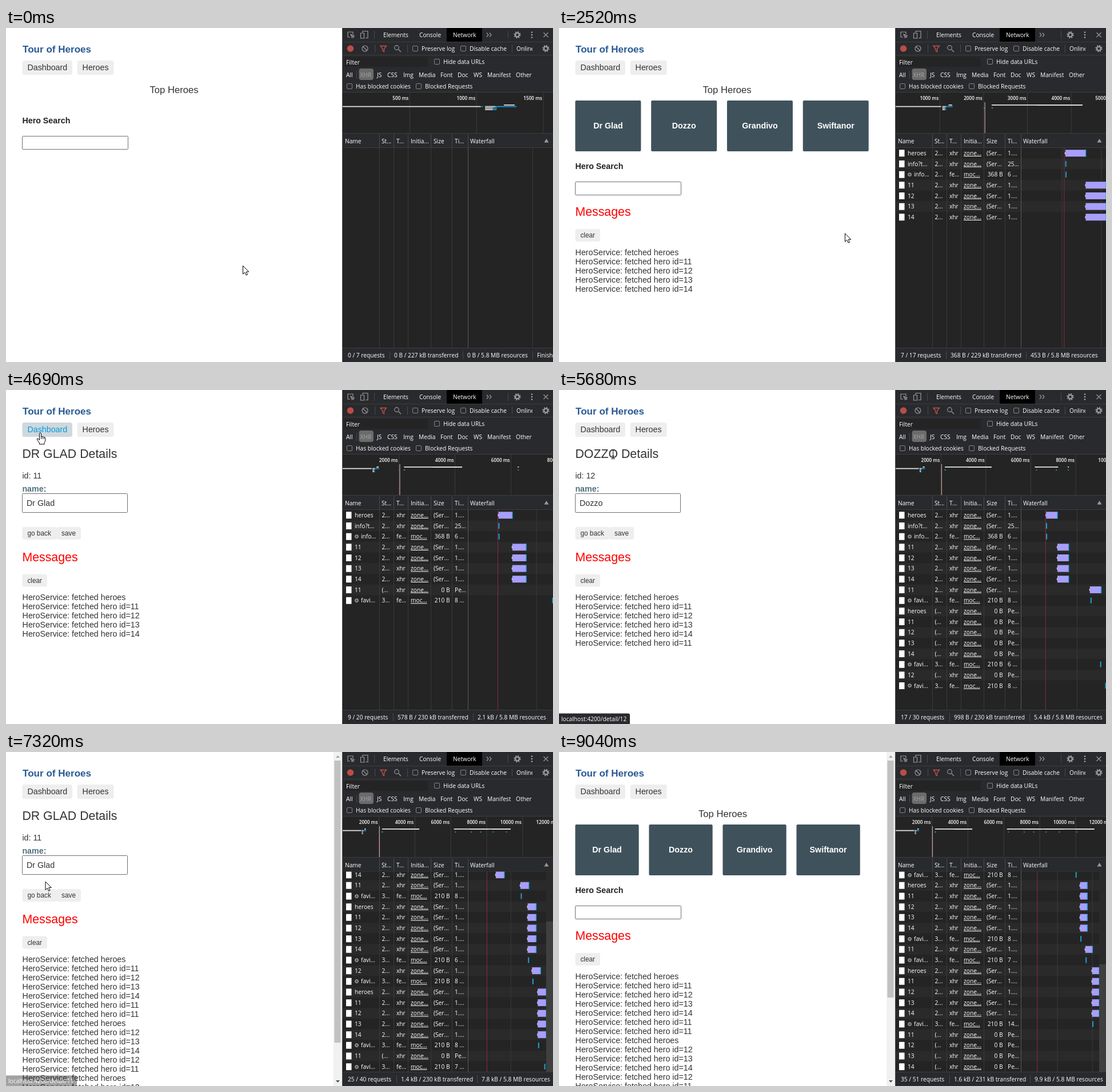
Recreate the animation shown at these times as an HTML page. Size 957 by 585 pixels, loop 9.21 s.

```html
<!DOCTYPE html>
<html lang="en">
<head>
<meta charset="utf-8">
<title>Tour of Heroes</title>
<style>
  html, body { margin: 0; width: 100%; height: 100%; overflow: hidden; background: #fff; }
  svg { display: block; width: 957px; height: 585px; }
  text { font: 14.27px "Liberation Sans", Arial, sans-serif; fill: #333; white-space: pre; }
  .b { font-weight: 700; }
  .h1 { font-size: 17.07px; font-weight: 700; fill: #285a94; }
  .h2 { font-size: 21.33px; }
  .h3 { font-size: 16.64px; }
  .btn { font-size: 11.85px; }
  .mid { text-anchor: middle; }
  .end { text-anchor: end; }
  .dev { font: 500 10.2px "Open Sans", "Noto Sans", sans-serif; fill: #fff; }
  .tick { font-size: 8.2px; font-weight: 600; }
  .u { text-decoration: underline; }
  .gear { font: 9.5px "DejaVu Sans", sans-serif; fill: #ddd; }
  .icon { fill: none; stroke: #9a9a9a; stroke-width: 1.2; }
</style>
</head>
<body>
<svg viewBox="0 0 957 585">
  <defs><clipPath id="list"><rect x="588" y="209.5" width="369" height="350.5"/></clipPath></defs>
  <g id="page"></g>
  <g id="tools"></g>
  <g id="net"></g>
  <g id="tip"></g>
  <g id="cursor"></g>
</svg>
<script>
const LOOP = 9210, CLOCK = 2090, LATENCY = 1040, ROW = 18.667;
const HEROES = { 11: 'Dr Glad', 12: 'Dozzo', 13: 'Grandivo', 14: 'Swiftanor' };
const IDS = [11, 12, 13, 14];
const $ = id => document.getElementById(id);

// Markup helpers
const rect = (x, y, w, h, fill, more = '') =>
  `<rect x="${x}" y="${y}" width="${Math.max(0, w)}" height="${h}" fill="${fill}" ${more}/>`;
const text = (x, y, str, cls = '', more = '') => `<text x="${x}" y="${y}" class="${cls}" ${more}>${str}</text>`;
const dev = (x, mid, str, cls = '') => text(x, mid + 3.7, str, 'dev ' + cls);
const path = (d, more = 'class="icon"') => `<path d="${d}" ${more}/>`;
const latest = (list, t) => list.filter(e => e[0] <= t).pop();

// Timeline: [time, shown hero id or 0 for the dashboard]
const VISITS = [[0, 0], [4100, 11], [4980, 0], [5510, 12], [6200, 0], [6940, 11], [7910, 0]];
const FAVICON_MS = [8, 6, 8, 8, 7, 14];

const rows = [], messages = [];
const fetchRows = (at, names) => names.forEach(name => rows.push({ at, end: at + LATENCY, name, kind: 'xhr' }));
const log = (at, names) => names.forEach(name => messages.push([at, name]));
const RELOAD = [11, 'heroes', 12, 13, 14];

fetchRows(100, ['heroes']);
rows.push({ at: 110, end: 110, name: 'info?t...', kind: 'info', ms: 25 });
rows.push({ at: 120, end: 120, name: 'info...', kind: 'worker', ms: 6 });
fetchRows(1130, IDS);
log(1130, ['heroes']);
log(2170, IDS);
VISITS.slice(1).forEach(([at, id], i) => {
  fetchRows(at, id ? [id] : ['heroes', ...IDS]);
  rows.push({ at: at + 80, end: at + 80, name: 'favi...', kind: 'worker', ms: FAVICON_MS[i] });
  log(at + LATENCY, id ? [id] : RELOAD);
});
fetchRows(8950, IDS);

const STATUS = [
  [0, '0 / 7', '0 B / 227', '0 B', 679, 807],
  [100, '3 / 13', '368 B / 229', '453 B', 685, 825],
  [1130, '7 / 17', '368 B / 229', '453 B', 685, 825],
  [4180, '9 / 20', '578 B / 230', '2.1 kB', 685, 825],
  [5060, '15 / 28', '788 B / 230', '3.7 kB', 691, 831],
  [5590, '17 / 30', '998 B / 230', '5.4 kB', 691, 831],
  [6280, '23 / 37', '1.2 kB / 230', '6.2 kB', 691, 832],
  [7020, '25 / 40', '1.4 kB / 230', '7.8 kB', 691, 832],
  [7990, '31 / 46', '1.6 kB / 231', '9.9 kB', 691, 832],
  [8950, '35 / 51', '1.6 kB / 231', '9.9 kB', 691, 832]
];
const OVERVIEW = [[0, 1575], [100, 2630], [460, 3200], [1140, 3900], [2150, 4800], [4180, 7510],
                  [5590, 9360], [7020, 11700]];
const PATH = [
  [0, 414.5, 416.5], [1840, 414.5, 416.5], [1950, 429, 410], [2370, 429, 410], [2520, 500, 360],
  [2850, 640, 300], [3270, 690, 282], [3630, 316, 263], [3950, 95, 200], [4100, 90, 194],
  [4370, 90, 194], [4690, 60, 75], [4840, 60, 75], [4980, 62, 77], [5350, 215, 165],
  [5510, 213, 168], [5680, 95, 113], [5760, 70, 80], [6200, 66, 77], [6610, 72, 100],
  [6850, 72, 100], [6940, 78, 170], [7320, 69, 227], [7770, 60, 246], [LOOP, 60, 246]
];
const CURSOR_GONE = 8060;
// Link preview: [shown, fade start, gone, hero id]
const TIPS = [[3890, 4150, 4180, 11], [5270, 5720, 5780, 12], [6900, 7190, 7420, 11]];

function pointer(t) {
  const i = PATH.findIndex(k => k[0] > t), [t0, x0, y0] = PATH[i - 1], [t1, x1, y1] = PATH[i];
  const k = (t - t0) / (t1 - t0);
  return { x: x0 + (x1 - x0) * k, y: y0 + (y1 - y0) * k, on: t < CURSOR_GONE };
}

function drawPage(t, p) {
  let shape = 'arrow', out = '';
  const over = (x, y, w, h, kind) => {
    const hit = p.on && p.x >= x && p.x < x + w && p.y >= y && p.y < y + h;
    if (hit) shape = kind;
    return hit;
  };
  const button = (x, y, w, h, label, cls, base) => {
    const hot = over(x, y, w, h, 'hand');
    out += rect(x, y, w, h, hot ? '#cfd8dc' : '#eee', 'rx="3.5"') +
      text(x + 9, base, label, cls, hot ? 'style="fill:#039be5"' : '');
  };
  const field = (y, w, h) => {
    const hot = over(28, y, w, h, 'beam');
    out += rect(28.5, y + .5, w - 1, h - 1, '#fff', `rx="1" stroke="${hot ? '#333' : '#707070'}"`);
  };

  const id = latest(VISITS, t)[1];
  const said = messages.filter(m => m[0] <= t);
  const loaded = said.length > 0;
  const top = id ? 292.5 : 322;
  const height = loaded ? top + 80 + 16 * said.length + 15 : 0;
  const width = height > 585 ? 573 : 588;

  out += text(29, 43.3, 'Tour of Heroes', 'h1');
  button(28.4, 57, 87.5, 25, 'Dashboard', '', 74);
  button(124.6, 57, 64, 25, 'Heroes', '', 74);

  if (id) {
    const name = HEROES[id];
    over(28, 102, 160, 20, 'beam');
    out += text(28.4, 119.3, name.toUpperCase() + ' Details', 'h2') + text(28.4, 154.8, 'id: ' + id) +
      text(28.4, 178, 'name:', 'b', 'style="fill:#52707c"');
    field(181, 185, 34);
    out += text(36, 203, name);
    button(28.4, 240, 60, 22, 'go back', 'btn', 255.3);
    button(88, 240, 43, 22, 'save', 'btn', 255.3);
  } else {
    out += text(width / 2, 113.7, 'Top Heroes', 'h3 mid');
    if (loaded) {
      const pitch = (width - 56.9) / 4, w = pitch - 17.78;
      IDS.forEach((hero, i) => {
        const x = 28.4 + i * pitch, hot = over(x, 127, w, 89, 'hand');
        out += rect(x, 127, w, 89, hot ? '#000' : '#3f525c', 'rx="2"') +
          text(x + w / 2, 176.2, HEROES[hero], 'b mid', 'style="fill:#fff"');
      });
    }
    const shift = loaded ? 79.7 : 0;
    out += text(28.4, 167 + shift, 'Hero Search', 'b', 'style="fill:#222"');
    field(Math.round(189 + shift), 186, 24);
  }

  if (loaded) {
    out += text(28.4, top + 7, 'Messages', 'h2', 'style="fill:#f00"');
    button(28.4, top + 30, 43.5, 22, 'clear', 'btn', top + 45.3);
    said.forEach(([, what], i) => {
      const subject = what === 'heroes' ? what : 'hero id=' + what;
      out += text(28.6, top + 75.5 + 16 * i, 'HeroService: fetched ' + subject);
    });
  }
  if (height > 585) {
    out += rect(573, 0, 15, 585, '#f1f1f1') + rect(574.5, 15, 11, 557 * 585 / height, '#c1c1c1') +
      path('M577 10l3.5-4 3.5 4z', 'fill="#a3a3a3"') + path('M577 575l3.5 4 3.5-4z', 'fill="#505050"');
  }
  return { out, shape };
}

function drawTools() {
  const box = (x, y) => rect(x + .5, y - 4.5, 9, 9, 'none', 'rx="1.5" stroke="#858585"');
  const line = y => rect(588, y, 369, 1, '#3d3d3d');
  const bar = (x, y, h = 14) => rect(x, y - h / 2, 1, h, '#48494c');
  const cog = (x, y) => `<circle cx="${x}" cy="${y}" r="3.4" class="icon" style="stroke-width:2.4"/>` +
    `<circle cx="${x}" cy="${y}" r="5.2" class="icon" stroke-dasharray="2 2.08" style="stroke-width:2"/>`;
  const labels = (y, list) => list.map(([x, s]) => dev(x, y, s)).join('');
  return rect(588, 0, 369, 585, '#242424') + rect(588, 0, 369, 112, '#292a2d') +
    rect(588, 185, 369, 24, '#292a2d') + rect(588, 560, 369, 25, '#292a2d') +
    rect(771, 0, 62, 24, '#000') + [24, 47, 112, 184, 209, 560].map(line).join('') +
    labels(12, [[660, 'Elements'], [723, 'Console'], [782, 'Network']]) +
    path('M602 16h-4V7h9v4M603 11l6 2.5-2.5 1-1 2.5zM607 15l2 2M624 8V5.5h9v12h-4M620.5 9h6v9h-6z') +
    path('M841 8.5l3 3.5-3 3.5M846 8.5l3 3.5-3 3.5M940.5 8l8 8M948.5 8l-8 8') +
    cog(894.5, 12) + cog(944.5, 36) +
    [7.5, 12, 16.5].map(y => `<circle cx="920" cy="${y}" r="1.3" fill="#aaa"/>`).join('') +
    bar(644, 12) + bar(878, 12) + bar(645, 36) + bar(702, 36) + bar(885, 36) + bar(613, 82) +
    '<circle cx="602.5" cy="36" r="5.8" fill="#b94d48"/>' +
    '<circle cx="628" cy="36" r="5" class="icon"/>' + path('M624.5 32.5l7 7') +
    path('M655 31.5h10.5l-4 5v5l-2.5-1.5v-3.5z', 'fill="none" stroke="#c7524c" stroke-width="1.3"') +
    '<circle cx="683.5" cy="34.5" r="3.8" class="icon"/>' + path('M686.5 37.5l4.5 4.5') +
    box(711, 36) + box(795, 36) + labels(36, [[727, 'Preserve log'], [811, 'Disable cache'], [893, 'Online']]) +
    rect(921, 28, 14, 17, '#292a2d') +
    rect(592, 51, 146, 17, '#242424') + dev(595, 60, 'Filter') + box(749, 59) + dev(765, 59, 'Hide data URLs') +
    rect(617.5, 71, 25.5, 20, '#6b6b6b', 'rx="4"') +
    text(619.5, 85.7, 'XHR', 'dev', 'style="fill:#a5a5a5"') +
    labels(82, [[595, 'All'], [649, 'JS'], [667, 'CSS'], [695, 'Img'], [722, 'Media'], [760, 'Font'],
      [790, 'Doc'], [818, 'WS'], [842, 'Manifest'], [892, 'Other']]) +
    box(596, 102) + dev(612, 102, 'Has blocked cookies') + box(717, 102) + dev(733, 102, 'Blocked Requests') +
    labels(198, [[593, 'Name'], [657, 'St...'], [683, 'T...'], [708, 'Initia...'], [748, 'Size'],
      [785, 'Ti...'], [812, 'Waterfall']]) +
    path('M941.5 200.5l4-6.5 4 6.5z', 'fill="#999"') + rect(588, 0, 1, 585, '#4a4a4a');
}

function drawOverview(t, shown) {
  const span = latest(OVERVIEW, t)[1], scale = 368 / span, X = ms => 589 + ms * scale;
  const step = span < 2000 ? 500 : span < 5000 ? 1000 : 2000;
  let out = '';
  for (let ms = step; ms < span + step; ms += step) {
    out += rect(X(ms), 113, 1, 71, '#3c3c3c') + dev(X(ms) - 1.5, 122, ms + ' ms', 'tick end');
  }
  const seg = (y, a, b, fill) => rect(X(a), y, (b - a) * scale, 1.8, fill);
  out += seg(136.7, 0, 1035, '#ddd') + seg(136.7, 1040, 1050, '#1c9ad6') + seg(134, 1207, 1288, '#ddd');
  [[136.7, 1145, 1301], [139.4, 1125, 1155], [142, 1125, 1152]].forEach(([y, mid, end]) => {
    out += seg(y, 1066, mid, '#ddd') + seg(y, mid, end, '#1c9ad6');
  });
  if (t >= 100) {
    out += rect(X(2030), 130, 1, 54, '#f0b5b0');
    out += rect(X(2010), 139.4, 2, 1.6, '#19a7b8');
  }
  shown.forEach(r => {
    if (r.end > t) return;
    const a = r.at + CLOCK;
    if (r.kind === 'xhr') out += seg(134, a, r.end + CLOCK, '#ddd');
    else out += rect(X(a) - 1, 139.4, 2, 1.6, '#19a7b8') + (r.at > 200 ? rect(X(a) - 1, 134, 2, 1.8, '#ddd') : '');
  });
  return out;
}

function drawRows(t, p, shown) {
  const scroll = Math.max(0, shown.length * ROW - 350.5);
  const times = shown.flatMap(r => [r.at, r.end]).filter(ms => ms <= t);
  const now = t < 100 ? 1330 : Math.max(...times, t >= 460 ? 460 : 0) + CLOCK;
  const scale = (scroll ? 135 : 147) / now, X = ms => 810.3 + ms * scale;
  const grid = now < 2000 ? 1000 : now < 5000 ? 2000 : 5000;
  let out = '', bars = '';
  shown.forEach((r, i) => {
    const y = 210 + i * ROW - scroll, mid = y + 9.3;
    const hot = p.on && p.x > 588 && p.y >= y && p.y < y + ROW;
    const done = r.end <= t, xhr = r.kind === 'xhr', worker = r.kind === 'worker';
    out += rect(589, y, 368, ROW, hot ? '#343b48' : i % 2 ? '#2a2a2a' : '#242424') +
      rect(595, mid - 6, 9.5, 12, '#fff', 'rx=".5"');
    if (worker) out += text(609.5, mid + 3.4, '⚙', 'gear');
    out += dev(worker ? 621 : 610, mid, r.name) +
      dev(657.5, mid, !done ? '(...' : r.name === 'favi...' ? '3...' : '2...') +
      dev(683, mid, worker ? 'fe...' : 'xhr') + dev(708, mid, worker ? 'moc...' : 'zone...', 'u');
    if (done && !worker) out += dev(748, mid, '(Ser...');
    else out += dev(776.5, mid, !done ? '0 B' : r.name === 'favi...' ? '210 B' : '368 B', 'end');
    out += dev(785, mid, !done ? 'Pe...' : xhr ? '1....' : r.ms > 9 ? r.ms + '...' : r.ms + ' ...');
    if (!done) return;
    const a = X(r.at + CLOCK), w = LATENCY * scale;
    bars += xhr
      ? rect(a - 1, mid - 2, 1.5, 4, '#ddd') + rect(a, mid - 6, w, 12, '#a79ffb') + rect(a + w - 1, mid - 6, 1.5, 12, '#29a3e8')
      : rect(Math.min(a, 956) - .5, mid - 5, 2, 10, '#19a2d4');
  });
  [653, 678, 703, 743, 780].forEach(x => out += rect(x, 186, 1, 374, '#3a3a3a'));
  out += rect(808, 186, 1, 374, '#5a5a5a');
  for (let ms = grid; ms <= now; ms += grid) out += rect(X(ms), 210, 1, 350, '#3a3a3a');
  if (t >= 100) out += rect(X(2120), 210, 1, 350, '#8a2842');
  out += bars;
  if (scroll) {
    const thumb = 350.5 * 350.5 / (shown.length * ROW);
    out += rect(945, 210, 12, 350, '#2a2a2a') + rect(945, 560 - thumb, 12, thumb, '#3f3f3f');
  }
  const heads = [653, 678, 703, 743, 780, 808].map(x => rect(x, 186, 1, 23, '#48494c')).join('');
  return heads + `<g clip-path="url(#list)">${out}</g>`;
}

function drawStatus(t) {
  const [, count, sent, size, x1, x2] = latest(STATUS, t);
  const bar = x => rect(x - 8, 566, 1, 14, '#48494c');
  return dev(598, 573, count + ' requests') + bar(x1) + dev(x1, 573, sent + ' kB transferred') +
    bar(x2) + dev(x2, 573, size + ' / 5.8 MB resources') + (t < 100 ? bar(929) + dev(929, 573, 'Finish') : '');
}

function drawTip(t) {
  const tip = TIPS.find(k => t >= k[0] && t < k[2]);
  if (!tip) return '';
  const alpha = Math.min(1, (tip[2] - t) / (tip[2] - tip[1]));
  return `<g opacity="${alpha.toFixed(2)}">` + rect(-3, 566.5, 127, 22, '#292a2d', 'rx="3"') +
    dev(4, 576, 'localhost:4200/detail/' + tip[3]) + '</g>';
}

const CURSORS = {
  arrow: path('M0 0V14.5L3.4 11.4 5.7 16.5 8 15.5 5.8 10.5H10.3Z', 'fill="#fff" stroke="#000"'),
  hand: path('M-1.5 1Q0-1 1.5 1V7Q3 5.5 4 7.2 5.5 6 6.4 7.8 8.5 7 8.8 9.5V13Q8.5 16 7 17.5V20H-1.5V18L-5.5 12Q-6 9.5-4 10L-1.5 12.5Z',
    'fill="#fff" stroke="#000" stroke-linejoin="round"') + path('M1.5 7v4M4 7.5v3.5M6.4 8v3', 'stroke="#000" stroke-width=".8"'),
  beam: path('M-3-7.5h2.3l.7.7.7-.7H3M-3 8h2.3L0 7.3.7 8H3M0-7V7.5M-2 3h4', 'fill="none" stroke="#000"')
};

const last = {};
function put(id, markup) {
  if (last[id] !== markup) $(id).innerHTML = last[id] = markup;
}

function render(t) {
  const p = pointer(t), shown = rows.filter(r => r.at <= t), page = drawPage(t, p);
  put('page', page.out);
  put('net', drawOverview(t, shown) + drawRows(t, p, shown) + drawStatus(t));
  put('tip', drawTip(t));
  put('cursor', p.on ? `<g transform="translate(${p.x.toFixed(1)} ${p.y.toFixed(1)})">${CURSORS[page.shape]}</g>` : '');
}

put('tools', drawTools());
const start = performance.now();
function frame() {
  render((performance.now() - start) % LOOP);
  requestAnimationFrame(frame);
}
frame();
</script>
</body>
</html>
```
